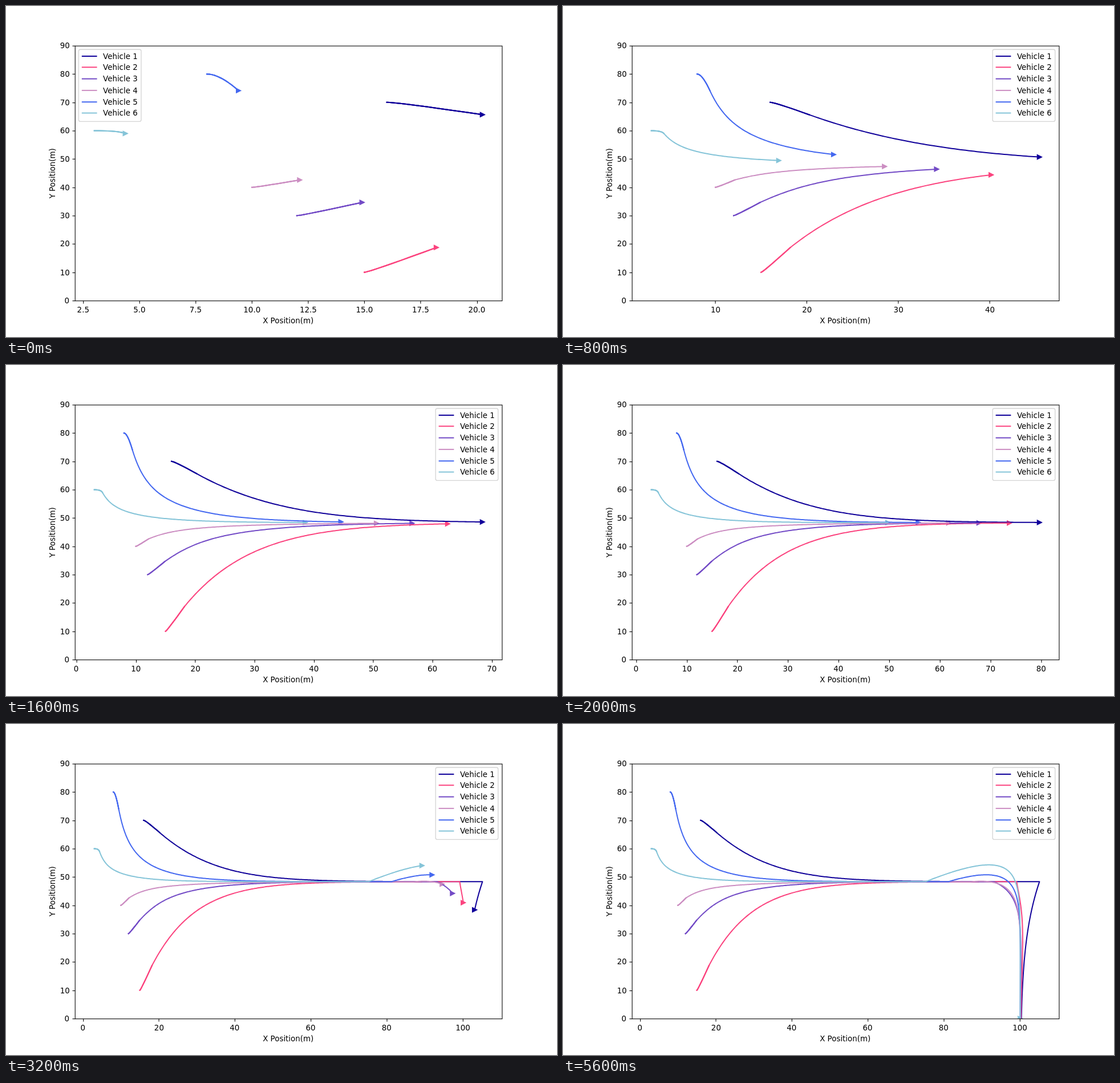
Write an HTML page with a canvas that moves like this. It is 966 by 580 pixels and loops after 5.7 s.

```html
<!DOCTYPE html>
<html lang="en">
<head>
<meta charset="utf-8">
<title>Vehicle paths</title>
<style>
html, body { margin: 0; width: 100%; height: 100%; overflow: hidden; background: #fff; }
canvas { display: block; }
</style>
</head>
<body>
<canvas id="plot" width="966" height="580"></canvas>
<script>
const ctx = document.getElementById('plot').getContext('2d');
const FRAME_MS = 100, FRAMES = 57;

// Plot area on a 1000 x 600 figure
const BOX = { l: 125, r: 900, t: 72, b: 534 };

// Lane heading right, then a column heading down; times count in frames
const SPEED = 2.8, LANE_Y = 48.35, EXIT_X = 100.15, TURN = 29.1;
const laneX = (k, t) => 23.75 - 6 * k + SPEED * t;
const exitY = (k, t) => 125.3 + 5.8 * k - SPEED * t;

// Start, place at time 0, and how strongly the x and y errors speed up their decay
const VEHICLES = [
  { color: '#10009a', from: [16, 70], at: [20.25, 65.65], qx: 0, qy: 0.0019 },
  { color: '#fb447f', from: [15, 10], at: [18.2, 18.74], qx: 0.03, qy: 0.0021 },
  { color: '#734bc6', from: [12, 30], at: [14.9, 34.66], qx: 0.04, qy: 0.0011 },
  { color: '#cc8ec2', from: [10, 40], at: [12.13, 42.6], qx: 0.02, qy: -0.002 },
  { color: '#4468f0', from: [8, 80], at: [9.41, 74.15], qx: 0.014, qy: 0.0031 },
  { color: '#85c4d8', from: [3, 60], at: [4.38, 59], qx: 0.0155, qy: 0.0059 }
];
const RX = 0.2, RY = 0.235;

const decay = (t, rate, quad) => Math.exp(-rate * t - quad * t * t);

// Curve from a level start into the velocity held at time 0
function depart(v, k, u) {
  const [x0, y0] = v.from, [x1, y1] = v.at;
  const vx = SPEED - RX * (x1 - laneX(k, 0)), vy = -RY * (y1 - LANE_Y);
  const cx = Math.max(x0 + 0.2, x1 - (y1 - y0) * vx / vy);
  const w = 1 - u;
  return [w * w * x0 + 2 * w * u * cx + u * u * x1, (1 - u * u) * y0 + u * u * y1];
}

function gather(v, k, t) {
  return [
    laneX(k, t) + (v.at[0] - laneX(k, 0)) * decay(t, RX, v.qx),
    LANE_Y + (v.at[1] - LANE_Y) * decay(t, RY, v.qy)
  ];
}

function turnDown(v, k, t) {
  const s = t - TURN, [x, y] = gather(v, k, TURN);
  const d = k ? decay(s, 0.25, 0.0125) : decay(s, 0.18, 0);
  const swing = k ? 0.24 / 2 ** k * s * s * Math.exp(-0.3 * s) : 0;
  return [
    EXIT_X + (x - EXIT_X) * d + swing,
    exitY(k, t) + (y - exitY(k, TURN)) * d
  ];
}

function position(k, t) {
  const v = VEHICLES[k];
  if (t < 0) return depart(v, k, 1 + t);
  if (t <= TURN) return gather(v, k, t);
  const [x, y] = turnDown(v, k, t);
  return [x, k === VEHICLES.length - 1 ? Math.max(0, y) : y];
}

function trail(k, until) {
  const pts = [];
  for (let i = -10; i < until * 10; i++) pts.push(position(k, i / 10));
  pts.push(position(k, until));
  return pts;
}

function stroke(pts, color, width) {
  ctx.beginPath();
  pts.forEach(([x, y], i) => i ? ctx.lineTo(x, y) : ctx.moveTo(x, y));
  ctx.strokeStyle = color;
  ctx.lineWidth = width;
  ctx.stroke();
}

// Text starts on a whole pixel; anchor 0 is left, 0.5 middle, 1 right
function text(str, x, y, anchor) {
  ctx.fillStyle = '#000';
  ctx.fillText(str, Math.round(x - anchor * ctx.measureText(str).width), y);
}

function marker([x, y], color) {
  const r = 4.17;
  ctx.beginPath();
  ctx.moveTo(x + r, y);
  ctx.lineTo(x - r, y - r);
  ctx.lineTo(x - r, y + r);
  ctx.closePath();
  ctx.fillStyle = ctx.strokeStyle = color;
  ctx.lineWidth = 1.39;
  ctx.lineJoin = 'miter';
  ctx.fill();
  ctx.stroke();
}

function tickStep(range) {
  const raw = range / 9, mag = 10 ** Math.floor(Math.log10(raw));
  return mag * [1, 2, 2.5, 5, 10].find(s => s * mag >= raw);
}

const toY = y => BOX.b - (BOX.b - BOX.t) * y / 90;
const snap = v => Math.round(v) + 0.5;

function axes(lo, hi, toX) {
  const step = tickStep(hi - lo);
  for (let i = Math.ceil(lo / step); i * step <= hi; i++) {
    const x = toX(i * step);
    stroke([[snap(x), BOX.b + 0.5], [snap(x), BOX.b + 5.4]], '#000', 1.11);
    text((i * step).toFixed(step % 1 ? 1 : 0), x, 555, 0.5);
  }
  for (let v = 0; v <= 90; v += 10) {
    const y = toY(v);
    stroke([[BOX.l - 4.4, snap(y)], [BOX.l + 0.5, snap(y)]], '#000', 1.11);
    text(String(v), 115.3, Math.round(y) + 5, 1);
  }
  ctx.strokeStyle = '#000';
  ctx.lineWidth = 1.11;
  ctx.strokeRect(BOX.l + 0.5, BOX.t + 0.5, BOX.r - BOX.l, BOX.b - BOX.t);
  text('X Position(m)', 512.5, 575, 0.5);
  ctx.save();
  ctx.translate(89, 303);
  ctx.rotate(-Math.PI / 2);
  text('Y Position(m)', 0, 0, 0.5);
  ctx.restore();
}

function legend(left) {
  ctx.beginPath();
  ctx.roundRect(left, 78.9, 113.4, 130.4, 2.8);
  ctx.fillStyle = 'rgba(255,255,255,0.8)';
  ctx.fill();
  ctx.strokeStyle = '#d4d4d4';
  ctx.lineWidth = 1.39;
  ctx.stroke();
  VEHICLES.forEach(({ color }, k) => {
    const y = Math.round(90.7 + 20.7 * k);
    stroke([[left + 5.6, y], [left + 33.3, y]], color, 2.08);
    text('Vehicle ' + (k + 1), left + 44.4, y + 5, 0);
  });
}

function draw(f) {
  ctx.setTransform(1, 0, 0, 1, 0, 0);
  ctx.fillStyle = '#fff';
  ctx.fillRect(0, 0, 966, 580);
  ctx.scale(966 / 1000, 580 / 600);
  ctx.font = '13.89px "DejaVu Sans", sans-serif';

  const far = position(0, Math.min(f, TURN))[0];
  const pad = 0.05 * (far - 3), lo = 3 - pad, hi = far + pad;
  const toX = x => BOX.l + (BOX.r - BOX.l) * (x - lo) / (hi - lo);
  const place = ([x, y]) => [toX(x), toY(y)];

  ctx.save();
  ctx.beginPath();
  ctx.rect(BOX.l, BOX.t, BOX.r - BOX.l, BOX.b - BOX.t);
  ctx.clip();
  VEHICLES.forEach(({ color }, k) => marker(place(position(k, f)), color));
  ctx.lineJoin = 'round';
  ctx.lineCap = 'square';
  VEHICLES.forEach(({ color }, k) => {
    stroke(trail(k, f).map(place), color, 2.08);
    // the first stretch is overdrawn and looks heavier
    const first = trail(k, 0).map(place);
    for (let i = 0; i < 2; i++) stroke(first, color, 2.08);
  });
  ctx.restore();

  axes(lo, hi, toX);
  legend(f < 2 ? 131.9 : 779.7);
}

let shown = -1;
function tick() {
  const f = Math.floor(performance.now() / FRAME_MS) % FRAMES;
  if (f !== shown) draw(shown = f);
  requestAnimationFrame(tick);
}
tick();
</script>
</body>
</html>
```
